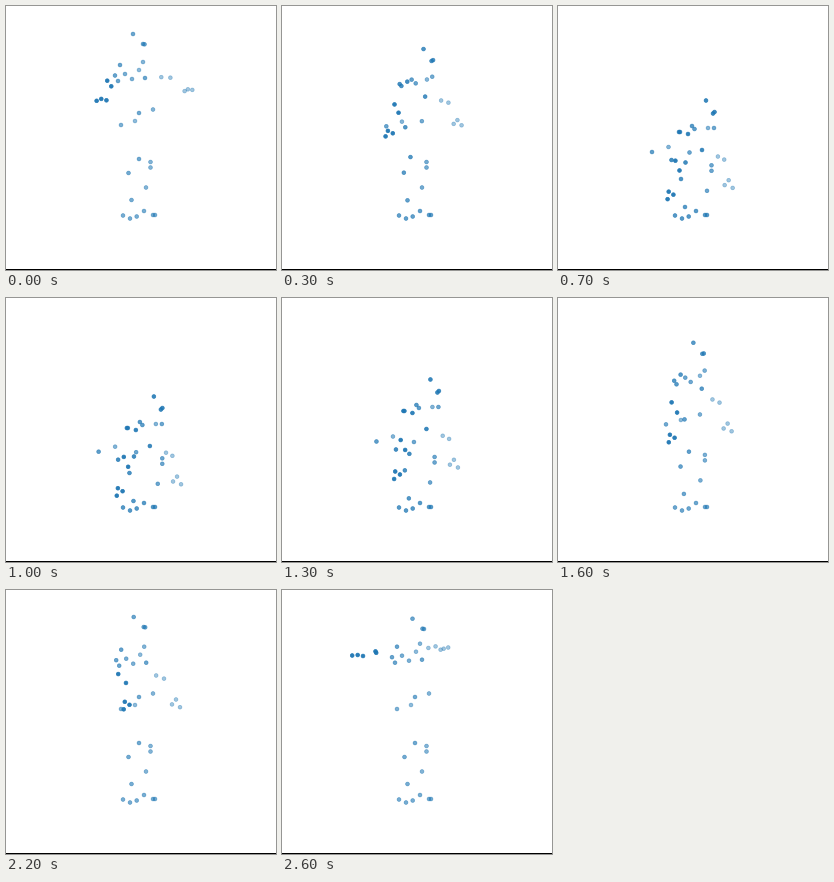
Recreate the animation shown at these times as a matplotlib script. Size 270x264 px, loop 3.7 s.

```python
import numpy as np
import matplotlib.pyplot as plt
from matplotlib.animation import FuncAnimation
from matplotlib.colors import to_rgb

W, H, DPI = 270, 264, 72
FRAMES, INTERVAL, LAST_MOVE = 37, 100, 26
DOT_RGB = to_rgb("#1f77b4")


def curve(t, *keys, flowing=False):
    """Ease through (time, value) keys; a flowing curve keeps its speed at inner keys."""
    times = np.array([key[0] for key in keys], float)
    values = np.array([key[1] for key in keys], float)
    t = np.clip(t, times[0], times[-1])
    slopes = np.gradient(values, times, axis=0) if flowing else np.zeros_like(values)
    slopes[0] = slopes[-1] = 0
    i = min(np.searchsorted(times, t, side="right") - 1, len(times) - 2)
    h = times[i + 1] - times[i]
    u = (t - times[i]) / h
    return (values[i] + (values[i + 1] - values[i]) * u * u * (3 - 2 * u)
            + h * slopes[i] * u * (1 - u) ** 2
            - h * slopes[i + 1] * u * u * (1 - u))


# Dots as (upright position, bent position, opacity)
FAR_SHOULDER = ((137, 56), (157, 91), .55)
NEAR_SHOULDER = ((114, 59), (131, 97), .68)
TRUNK = (
    FAR_SHOULDER,
    ((133, 64), (151, 91), .5),
    ((126, 73), (137.5, 92), .58),
    ((119, 68), (135, 89), .6),
    ((139, 72), (145, 113), .66),
    ((109, 69.5), (122, 95), .67),
    ((112, 75), (123, 95), .66),
    NEAR_SHOULDER,
)
HEAD = (
    ((127, 28), (149, 63.5), .66),
    ((137, 38), (156, 76.5), .66),
    ((138.5, 38.3), (157.5, 75), .66),
)
PELVIS = (
    ((129, 115), (115, 116), .5),
    ((147, 103.5), (136, 121.5), .55),
    ((115, 119), (98.5, 121), .58),
    ((133, 107), (118, 129), .64),
)
FAR_LEG = tuple((p, p, .55) for p in ((144.5, 156), (144.5, 161.5), (140, 181.5)))
NEAR_LEG = (
    ((133, 153), (126, 150), .64),
    ((122.5, 167), (121.5, 166.5), .62),
    ((125.5, 194), (125.5, 194.5), .6),
)
FEET = tuple((p, p, .6) for p in ((117, 209.5), (124, 212.5), (130.7, 210.5),
                                  (138, 205), (147, 209), (149, 209)))

# Hand dots around the wrist, as (hanging offset, raised offset)
NEAR_HAND = (((-1.2, -3.5), (0, -.5)), ((3.5, -.5), (5.3, .5)), ((-2.3, 4), (-5.5, 0)))
FAR_HAND = (((0, -4.2), (-.5, .2)), ((-4, .7), (-3.6, 1.2)), ((4, 3.5), (4, -1)))


def blend(start, end, amount):
    return np.add(start, np.subtract(end, start) * amount)


def arm(shoulder, wrist, hand, lift, upper, lower):
    """Two elbow dots along the line from shoulder to wrist, then the hand."""
    reach = wrist - shoulder
    elbow = [shoulder + reach * share + offset for share, offset in (upper, lower)]
    return elbow + [wrist + blend(hang, raised, lift) for hang, raised in hand]


def pose(frame):
    """Positions and colours of all dots for one frame."""
    t = min(frame, LAST_MOVE)
    bend = curve(t, (0, 0), (5, 1), (13, 1), (18, 0))
    sink = curve(t, (0, 0), (5, 0), (7, 1), (13, .58), (18, 0), flowing=True)
    crouch = curve(t, (0, 0), (3, 0), (5, 0), (7, 1), (13, .9), (18, 0), flowing=True)
    lift = curve(t, (0, .8), (5, 0), (22, 0), (24, 1))
    sway = curve(t, (13, (0, 0)), (18, (4.3, -1)), (22, (1.2, .7)), (26, (1, -2.3)))
    nod = curve(t, (13, (0, 0)), (18, (1.2, -1)), (22, (.7, -1)), (26, (3.5, .7)))
    drop = sink * np.array((-1, 31))

    points, alphas = [], []

    def add(part, shift):
        for upright, bent, opacity in part:
            points.append(blend(upright, bent, bend) + shift)
            alphas.append(min(opacity + (opacity - .45) * bend, 1))

    def add_arm(shoulder, wrist, opacity, *shape):
        joint = blend(*shoulder[:2], bend) + drop + sway
        dots = arm(joint, wrist + drop, *shape)
        points.extend(dots)
        alphas.extend([opacity] * len(dots))

    far_wrist = curve(t, (0, (182.3, 84)), (5, (171.5, 147.3)), (13, (172.5, 148)),
                      (18, (168.3, 112.3)), (22, (170, 113.7)), (23, (184.7, 89)),
                      (24, (162.7, 64)), (26, (162.2, 58.5)))
    near_wrist = curve(t, (0, (95.5, 94)), (5, (112.5, 158)), (13, (115, 159)),
                       (18, (112.3, 122.5)), (22, (120, 115.3)), (23, (89, 95)),
                       (24, (72.5, 68.5)), (26, (75.7, 65.5)))

    add_arm(FAR_SHOULDER, far_wrist, .42, FAR_HAND, lift,
            (.47, (-3, 2)), (.56, (2, 0)))
    add(PELVIS, crouch * np.array((-4.5, 25)))
    add(TRUNK, drop + sway)
    add(HEAD, drop + nod)
    add(FAR_LEG, crouch * np.array((9, 3.3)))
    add(NEAR_LEG, crouch * np.array((1.5, 6.5)))
    add(FEET, 0)
    add_arm(NEAR_SHOULDER, near_wrist, .95, NEAR_HAND, lift,
            (.42, (-5, 1)), (.58, (2, 1)))
    return np.array(points), [(*DOT_RGB, a) for a in alphas]


fig = plt.figure(figsize=(W / DPI, H / DPI), dpi=DPI, facecolor="white")
ax = fig.add_axes([0, 0, 1, 1])
ax.set(xlim=(0, W), ylim=(H, 0))
ax.axis("off")
ax.axhspan(H - 1, H, color="black", lw=0)

start_points, start_colors = pose(0)
dots = ax.scatter(*start_points.T, s=14, c=start_colors, linewidths=.7)


def draw(frame):
    points, colors = pose(frame)
    dots.set_offsets(points)
    dots.set_color(colors)
    return (dots,)


anim = FuncAnimation(fig, draw, frames=FRAMES, interval=INTERVAL,
                     repeat=True, repeat_delay=0, blit=False)
plt.show()
```
